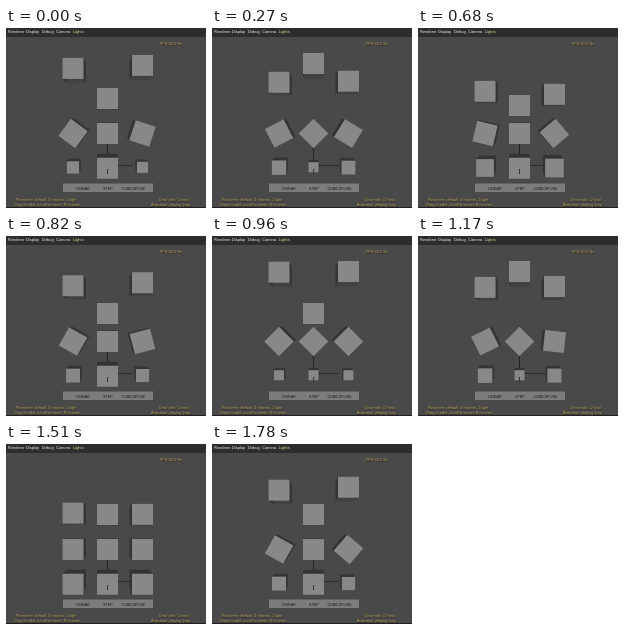
An HTML page with a canvas for the animation above (1850 ms loop, 200x180 px).

```html
<!DOCTYPE html>
<html>
<head>
<meta charset="utf-8">
<style>
html, body { margin: 0; width: 100%; height: 100%; overflow: hidden; background: #494949; }
canvas { display: block; width: 200px; height: 180px; }
</style>
</head>
<body>
<canvas id="stage" width="200" height="180"></canvas>
<script>
const g = document.getElementById('stage').getContext('2d');
const LOOP = 1850, FRAMES = 27;
const COLUMNS = [67, 101.5, 136.5];
const VANISH = { x: 101.5, y: 90 };

// Key times are in frames; the last key holds until the cycle restarts.
const MOVE = { times: [-5.25, 0.85, 7.9, 14.1, 20.5], values: [70.5, 35.5, 77.5, 35.5, 70.5] };
const TURN = { times: [-5, 1.2, 8.3, 14, 21.3], values: [0, 45, 90, 135, 180],
               swing: [430, 255, 190, 142] };
const SCALE = { times: TURN.times, values: [1, 0.48, 1, 0.48, 1] };

const mix = (a, b, u) => a + (b - a) * u;
const smooth = u => u * u * (3 - 2 * u);

// mode: 0 linear, 1 step, 2 cubic
function sample({ times, values, swing }, mode, frame) {
  const k = frame >= times[0] + FRAMES ? frame - FRAMES : frame;
  let i = 3;
  while (i && k < times[i]) i--;
  const u = Math.min(1, (k - times[i]) / (times[i + 1] - times[i]));
  if (mode === 1) return values[u >= 1 ? i + 1 : i];
  if (mode === 0) return mix(values[i], values[i + 1], u);
  return mix(values[i], values[i + 1], smooth(u)) + (swing ? swing[i] * u * (1 - u) : 0);
}

function fillPath(points, color) {
  g.fillStyle = color;
  g.beginPath();
  points.forEach(p => g.lineTo(p[0], p[1]));
  g.closePath();
  g.fill();
}

function cube(x, y, size, degrees) {
  const r = 10.5 * size, turn = degrees * Math.PI / 180;
  const corner = i => turn + (i * 2 - 3) * Math.PI / 4;
  const front = [0, 1, 2, 3].map(i => [
    x + r * Math.SQRT2 * Math.cos(corner(i)),
    y + r * Math.SQRT2 * Math.sin(corner(i))
  ]);
  const depth = 0.1 * size;
  const back = front.map(p => [mix(p[0], VANISH.x, depth), mix(p[1], VANISH.y, depth)]);
  front.forEach((p, i) => {
    const j = (i + 1) % 4;
    const facesDown = Math.sin(corner(i + 0.5)) > 0.8;
    fillPath([p, front[j], back[j], back[i]], facesDown ? '#414141' : '#343434');
  });
  fillPath(front, '#888');
}

function text(str, x, y, color, size = 4) {
  g.font = size + 'px "Liberation Sans", Arial, sans-serif';
  g.fillStyle = color;
  g.fillText(str, x, y);
}

function info(str, x, y, size) {
  text(str, x + 0.5, y + 0.5, '#222', size);
  text(str, x, y, '#b9a052', size);
}

function rect(x, y, w, h, color) {
  g.fillStyle = color;
  g.fillRect(x, y, w, h);
}

function drawOverlay() {
  rect(0, 0, 200, 9, '#2d2d2d');
  rect(0, 179, 200, 1, '#222');
  [['Renderer', 2], ['Display', 20], ['Debug', 36], ['Camera', 50]]
    .forEach(([s, x]) => text(s, x, 5, '#eee'));
  text('Lights', 67, 5, '#e6d9a0');
  info('FPS: 60.0 Hz', 154, 17, 3.7);
  info('Renderer: default, 9 objects, 1 light', 10, 173, 3.9);
  info('Drag to orbit, scroll to zoom, R to reset', 8, 178, 3.9);
  info('Draw calls: 12 total', 153, 173, 3.5);
  info('Animation: playing, loop', 145, 178, 3.7);
}

function draw(frame) {
  rect(0, 0, 200, 180, '#494949');
  rect(101, 113, 1, 27, '#222');
  rect(102, 137, 25, 1, '#2b2b2b');
  rect(57, 155.5, 90, 8.5, '#7c7c7c');

  COLUMNS.forEach((x, mode) => {
    const size = sample(SCALE, mode, frame);
    cube(x, sample(MOVE, mode, frame), 1, 0);
    cube(x, 105.5, 1, sample(TURN, mode, frame));
    cube(x, 138.3 + 2 * size, size, 0);
  });

  rect(101, 141, 1, 5, '#333');
  text('LINEAR', 70, 161.5, '#181818', 3.8);
  text('STEP', 97, 161.5, '#181818', 3.7);
  text('CUBICSPLINE', 115.5, 161.5, '#181818', 3.6);
  drawOverlay();
}

function tick() {
  const t = performance.now() % LOOP;
  draw(Math.floor((t + 6) * FRAMES / LOOP) % FRAMES);
  requestAnimationFrame(tick);
}
tick();
</script>
</body>
</html>
```
